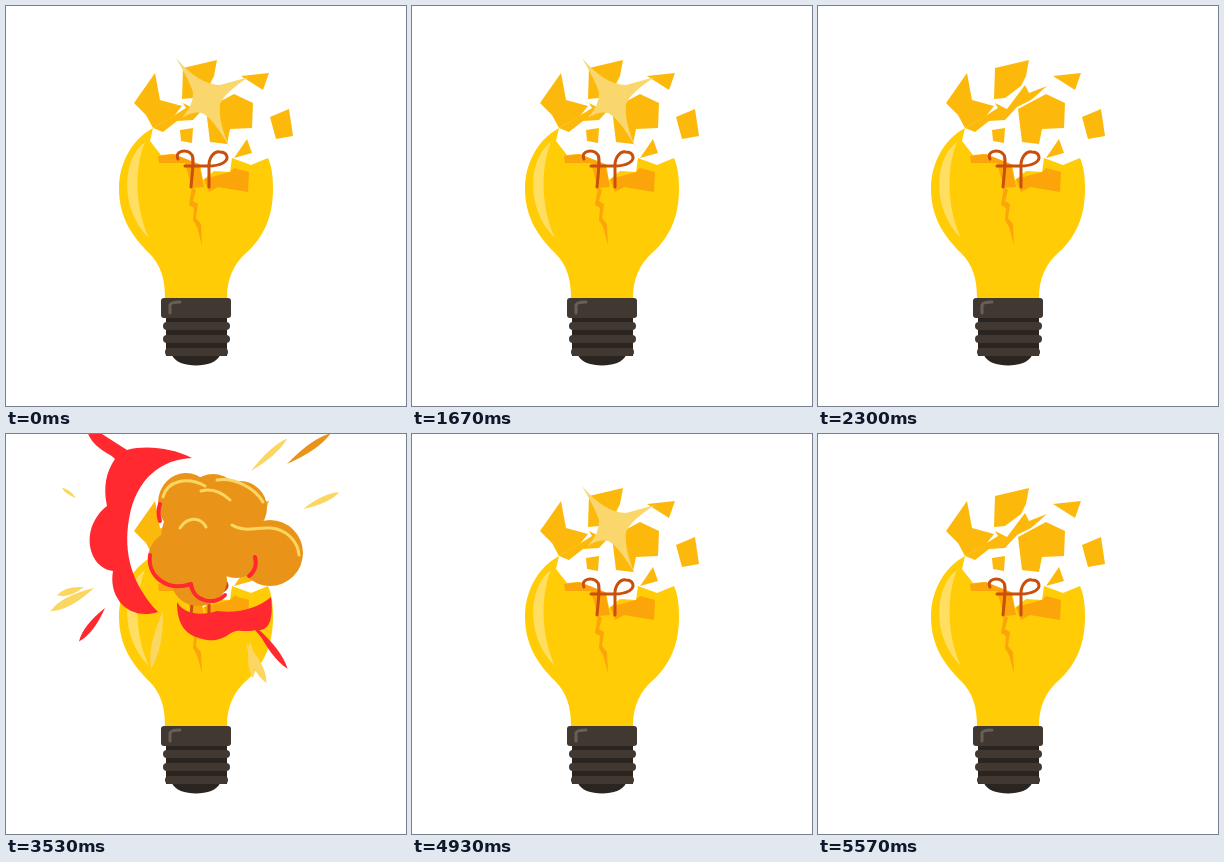
These frames come from a looping animation (400x400 px, 6.53 s). An HTML page with a canvas:

```html
<!DOCTYPE html>
<html lang="en">
<head>
<meta charset="utf-8">
<title>Bursting bulb</title>
<style>
  html, body { margin: 0; width: 100%; height: 100%; overflow: hidden; background: #fff; }
  canvas { display: block; width: 100vw; height: 100vh; }
</style>
</head>
<body>
<canvas id="stage" width="400" height="400"></canvas>
<script>
const ctx = document.getElementById('stage').getContext('2d');
const LOOP = 6530;
const BURSTS = [[0, 100], [1670, 1730], [3300, 3360], [4930, 5000]]; // flash start, flash end
const STEPS = [0, 80, 160, 230, 300, 370, 470, 570];
const CENTER = [200, 112];

const YELLOW = '#ffcc05', GLASS = '#fdb90b', SHADE = '#fba50a', PALE = '#fbd661',
      ORANGE = '#e99419', RED = '#ff292f', WIRE = '#c94f0b',
      METAL = '#403831', METAL_DARK = '#2b2521', METAL_LIGHT = '#675f58';

function fill(path, color) {
  ctx.fillStyle = color;
  ctx.fill(new Path2D(path));
}

function stroke(path, color, width) {
  ctx.strokeStyle = color;
  ctx.lineWidth = width;
  ctx.lineCap = ctx.lineJoin = 'round';
  ctx.stroke(new Path2D(path));
}

function bar(x, y, w, h, r, color) {
  ctx.fillStyle = color;
  ctx.beginPath();
  ctx.roundRect(x, y, w, h, r);
  ctx.fill();
}

function blob(x, y, rx, ry = rx) {
  ctx.fillStyle = ORANGE;
  ctx.beginPath();
  ctx.ellipse(x, y, rx, ry, 0, 0, Math.PI * 2);
  ctx.fill();
}

const mix = (a, b, k) => a + (b - a) * k;

const SHARDS = [
  'M149 67L154 94L176 100L168 110L147 122L140 109L128 97Z',
  'M177 62L211 54L208 70L203 80L187 92L176 93Z',
  'M235 70L263 67L257 84Z',
  'M264 111L283 103L287 130L270 133Z',
  'M200 103L228 88L247 97L246 122L224 123L221 138L204 136Z',
  'M147 122L164 112L180 102L177 97L189 103L207 79L211 87L229 80L213 94L199 101L187 114L171 115L157 126Z',
  'M174 124L187 122L186 137L175 135Z',
  'M241 133L246 147L228 152Z'
];

function drawBulb() {
  fill('M147 122C125 134 113 158 113 183C113 213 128 232 143 247C155 259 159 273 159 292' +
       'H221C221 272 228 258 240 247C257 232 267 212 267 183C267 171 266 161 262 152' +
       'L245 159L226 152L224 166L208 165L197 174L194 158L180 157L166 148L155 149L144 135Z', YELLOW);
  fill('M152 150L168 148L193 158L198 181L186 182L179 157L153 157Z', SHADE);
  fill('M198 173L224 166L228 162L243 166L242 186L212 181L203 186Z', SHADE);
  fill('M186 181L190 184L187 195L192 198L190 212L195 218L196 239L191 221L187 214L188 202L183 199Z', SHADE);
  fill('M139 136C116 152 113 203 143 232C128 199 129 160 139 136Z', '#ffde61');
  SHARDS.forEach(s => fill(s, GLASS));
  stroke('M172 153C168 145 181 142 186 149C188 153 187 160 185 181M179 160H204' +
         'M203 181V163C202 150 209 145 214 146C221 146 224 153 217 157C213 159 208 160 203 160', WIRE, 3);
}

function drawBase() {
  bar(160, 306, 61, 44, 0, METAL_DARK);
  fill('M166 349H214C209 363 171 363 166 349Z', METAL_DARK);
  bar(155, 292, 70, 20, 3, METAL);
  [[157, 316], [157, 329], [159, 342]].forEach(([x, y]) => bar(x, y, 381 - 2 * x, 8, 4, METAL));
  stroke('M164 307V299Q165 296 174 296', METAL_LIGHT, 3);
}

function drawStar() {
  fill('M170 52Q193 79 214 79L243 71Q219 86 214 98Q212 116 224 142Q207 112 196 107Q187 105 176 112Q188 98 187 86Q182 72 170 52Z', '#f9d76d');
}

function drawFireball(scale) {
  ctx.save();
  ctx.translate(...CENTER);
  ctx.scale(scale, scale);
  ctx.translate(-CENTER[0], -CENTER[1]);
  fill('M83 0H96L121 16C140 11 166 14 186 24C157 25 130 43 123 85C117 119 126 151 152 178' +
       'C124 187 102 165 107 137C82 134 73 94 101 72C97 53 100 38 109 25Z', RED);
  fill('M171 168C179 181 195 182 211 177C232 180 252 174 265 163C268 187 262 197 252 196' +
       'L277 229L249 196C240 199 232 194 225 199C211 209 200 207 190 203C176 198 171 185 171 168Z', RED);
  [[180, 69, 28, 30], [207, 68, 28], [234, 74, 27], [264, 119, 33], [197, 103, 42],
   [169, 125, 27, 28], [193, 146, 28, 26], [230, 117, 27]].forEach(b => blob(...b));
  stroke('M157 63C161 47 181 42 199 52M211 46C228 43 249 54 257 68M226 91C239 99 251 93 264 94C281 95 292 108 293 121' +
         'M174 94C181 83 194 82 200 93M195 57Q210 53 224 66', PALE, 3);
  stroke('M144 121C141 143 162 158 185 150C187 168 209 172 219 161M154 87Q151 78 154 70M249 123Q252 135 243 142', RED, 4);
  ctx.restore();
}

// Outer edge: p0..p3 cubic. The last two points control the inner edge.
const CRESCENTS = [
  [RED, 169, 11, 128, 2, 93, 32, 95, 77, 111, 60, 125, 21],
  [RED, 95, 73, 83, 92, 82, 125, 97, 136, 90, 112, 98, 88],
  [RED, 107, 136, 104, 157, 116, 174, 142, 171, 124, 166, 119, 149],
  [RED, 172, 195, 196, 209, 264, 206, 266, 166, 239, 192, 198, 196],
  [ORANGE, 152, 81, 153, 23, 234, 12, 242, 76, 222, 51, 174, 46],
  [ORANGE, 221, 30, 253, 17, 282, 41, 277, 88, 258, 80, 263, 43],
  [ORANGE, 262, 79, 302, 81, 312, 132, 276, 139, 291, 120, 285, 95]
];

function drawCrescent([color, x0, y0, x1, y1, x2, y2, x3, y3, ix, iy, jx, jy], thick) {
  ctx.fillStyle = color;
  ctx.beginPath();
  ctx.moveTo(x0, y0);
  ctx.bezierCurveTo(x1, y1, x2, y2, x3, y3);
  ctx.bezierCurveTo(mix(x2, ix, thick), mix(y2, iy, thick), mix(x1, jx, thick), mix(y1, jy, thick), x0, y0);
  ctx.fill();
}

function drawRemains(thick) {
  CRESCENTS.forEach(c => drawCrescent(c, thick));
  if (thick === 1) {
    blob(166, 123, 22);
    blob(199, 145, 28, 20);
    blob(247, 117, 22, 24);
    fill('M150 103C154 79 177 62 201 73C216 72 226 75 235 81C214 78 195 82 181 91C190 94 199 101 203 111L180 122Z', ORANGE);
    stroke('M159 68C169 46 196 39 211 47M234 31C255 31 270 44 271 64M278 88C293 94 297 110 292 122M253 98C267 107 266 124 255 134', PALE, 3.5);
    stroke('M147 121C149 137 168 144 186 137C187 154 204 164 216 153M228 122Q229 130 237 132', RED, 4);
  } else {
    ctx.save();
    ctx.globalAlpha = 1;
    drawCrescent([ORANGE, 147, 117, 148, 153, 188, 139, 186, 137, 178, 137, 163, 137], thick);
    drawCrescent([ORANGE, 184, 148, 186, 174, 222, 169, 227, 145, 214, 158, 198, 161], thick);
    ctx.restore();
  }
}

// Inner end, outer end, half width, color
const SPARKS = [
  [281, 30, 328, -3, 4, ORANGE],
  [245, 37, 284, 2, 3.5, PALE],
  [297, 75, 336, 57, 3.5, PALE],
  [88, 154, 41, 179, 5, PALE],
  [78, 153, 49, 162, 4, PALE],
  [99, 174, 71, 210, 4, RED],
  [250, 193, 284, 238, 4, RED],
  [240, 209, 262, 252, 5, PALE],
  [244, 207, 247, 247, 4, PALE],
  [110, 24, 80, -2, 4, RED],
  [70, 64, 55, 53, 2, PALE],
  [157, 177, 144, 239, 5, PALE]
];

function drawSpark([x0, y0, x1, y1, w, color], tail, head) {
  const dx = x1 - x0, dy = y1 - y0, len = Math.hypot(dx, dy);
  const nx = -dy / len * w * 1.7, ny = dx / len * w * 1.7;
  const at = k => [x0 + dx * k, y0 + dy * k];
  const [ax, ay] = at(tail), [bx, by] = at(head), [mx, my] = at(mix(tail, head, .65));
  ctx.fillStyle = color;
  ctx.beginPath();
  ctx.moveTo(ax, ay);
  ctx.quadraticCurveTo(mx + nx, my + ny, bx, by);
  ctx.quadraticCurveTo(mx - nx, my - ny, ax, ay);
  ctx.fill();
}

// Per step: fireball scale, crescent thickness, spark tail, spark head
const POSES = [
  [.5, 0, 0, 0], [.82, 0, 0, .5], [1, 0, 0, .93],
  [0, 1, .57, 1], [0, .55, .78, 1], [0, .22, .9, 1], [0, 0, .95, 1]
];

function drawBurst(step) {
  const [scale, thick, tail, head] = POSES[step];
  if (scale) drawFireball(scale);
  if (thick) drawRemains(thick);
  if (head) SPARKS.slice(0, step === 2 ? 12 : 11).forEach(s => drawSpark(s, tail, head));
}

function draw(t) {
  ctx.fillStyle = '#fff';
  ctx.fillRect(0, 0, 400, 400);
  drawBulb();
  drawBase();
  const [, flashEnd] = BURSTS.findLast(([start]) => t >= start);
  const age = t - flashEnd;
  if (age < 0) drawStar();
  else if (age < STEPS[7]) drawBurst(STEPS.findLastIndex(s => age >= s));
}

const began = performance.now();
function tick() {
  draw((performance.now() - began) % LOOP);
  requestAnimationFrame(tick);
}
tick();
</script>
</body>
</html>
```
